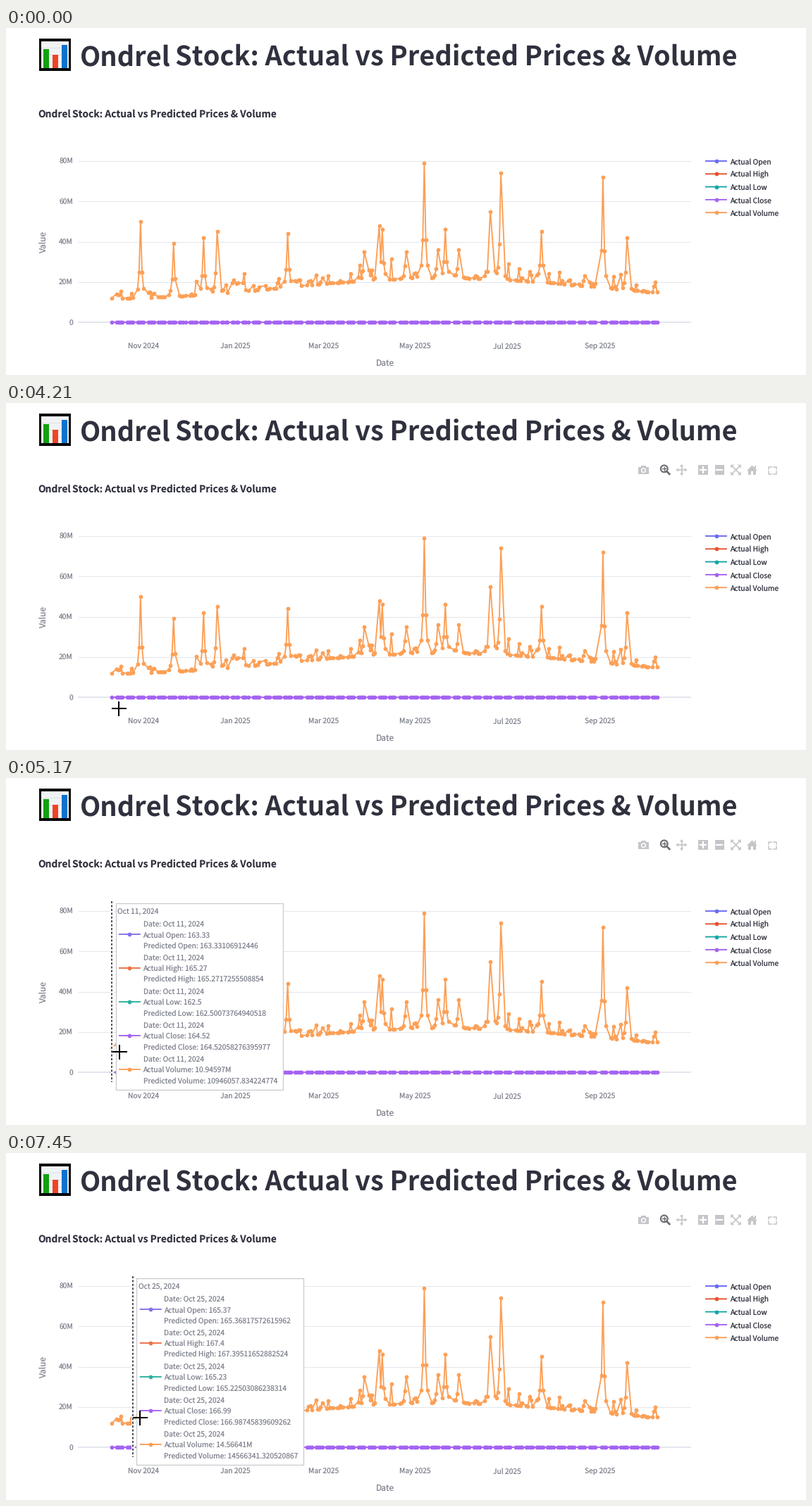
Write a matplotlib script that moves like this. It is 1135 px wide and 493 px high and loops after 8000 ms.

```python
import numpy as np
import matplotlib.pyplot as plt
from matplotlib.animation import FuncAnimation
from matplotlib.patches import Circle, Polygon, Rectangle
from matplotlib.transforms import Affine2D

W, H, DPI = 1135, 493, 128
PT = 72 / DPI                      # points per pixel
LOOP, STEP = 8000, 40
NAME = "Ondrel"
HEADING = "Stock: Actual vs Predicted Prices & Volume"

INK, GREY, GRID, ICON = "#2f313e", "#80838f", "#e4e6ed", "#c6c6ca"
SERIES = {"Open": "#6b6bf3", "High": "#e6522f", "Low": "#17a6a9",
          "Close": "#a463f2", "Volume": "#fca057"}
TIP_COLORS = ["#8570e8", "#ec7145", "#2bb09f", "#a463f2", "#fca057"]

plt.rcParams.update({"font.family": "Noto Sans CJK JP", "text.hinting": "none",
                     "savefig.dpi": DPI})
fig = plt.figure(figsize=(W / DPI, H / DPI), dpi=DPI, facecolor="white")
ax = fig.add_axes([0, 0, 1, 1])
ax.set(xlim=(0, W), ylim=(H, 0))
ax.axis("off")


def line(xs, ys, color, width, **kw):
    return ax.plot(xs, ys, color=color, lw=width * PT, **kw)[0]


def marked(xs, ys, color, **kw):
    return line(xs, ys, color, 1.9, marker="o", ms=5.8 * PT, mew=0, **kw)


def key(x, y, color, **kw):
    """A short line with a dot in its middle."""
    return [line([x - 14.5, x + 14.5], [y, y], color, 1.9, snap=False, **kw),
            marked([x], [y], color, **kw)]


def rect(x, y, w, h, color, **kw):
    return ax.add_patch(Rectangle((x, y), w, h, fc=color, lw=0, **kw))


def poly(points, color, **kw):
    kw.setdefault("lw", 0)
    return ax.add_patch(Polygon(points, fc=color, **kw))


def disc(x, y, r, color):
    return ax.add_patch(Circle((x, y), r, fc=color, lw=0))


def text(x, y, s, px=11.5, color=GREY, **kw):
    # the font's Latin glyphs are drawn 1.118 times larger than nominal
    return ax.text(x, y, s, fontsize=px / 1.118 * PT, color=color, **kw)


# ---- data: a slow swell with noise, and a few busy days ---------------

HOLIDAYS = {48, 75, 82, 90, 101, 129, 189, 227, 251, 266, 325}
PEAKS = {19: 50, 41: 39, 61: 42, 70: 45, 117: 44, 168: 35, 178: 48, 180: 46,
         196: 35, 208: 79, 217: 36, 222: 46, 231: 36, 252: 55, 259: 74,
         286: 45, 327: 72, 343: 42}

# predicted open, high, low, close and volume, then actual volume in millions
PRICES = {
    0: (163.33106912446, 165.2717255508854, 162.50073764940518,
        164.52058276395977, 10946057.834224774, 10.94597),
    4: (167.13836539629463, 169.090651320317, 166.05067231997361,
        166.900917592685, 14829368.951941328, 14.82934),
    7: (164.87034520466455, 166.36957241497137, 164.74954269443697,
        165.04961436885458, 13091239.283385437, 13.09127),
    14: (165.36817572615962, 167.39511652882524, 165.22503086238314,
         166.98745839609262, 14566341.320520867, 14.56641),
}


def day_x(day):
    return 150.4 + 2.13 * day


def value_y(millions):
    return 418.2 - 2.867 * millions


def make_volume(days):
    rng = np.random.default_rng(12)
    swell = 12 + 10 * np.sin(np.pi * days / 440) ** 2
    v = swell + rng.normal(0, 1, len(days)) * (2 + 1.8 * np.minimum(days / 60, 1))
    for day, top in PEAKS.items():
        v = np.maximum(v, swell + (top - swell) * np.exp(-1.1 * abs(days - day)))
    return np.maximum(v, 7)


# day 0 is a Friday
days = np.array([d for d in range(364) if d % 7 not in (1, 2) and d not in HOLIDAYS])
volume = make_volume(days)


# ---- page -------------------------------------------------------------

def draw_heading():
    rect(46.5, 15, 45.5, 45.5, "#050505")
    rect(50, 18.5, 38.5, 38.5, "#f0f3f5")
    for y in (28, 38, 48):
        rect(50, y, 38.5, 0.8, "#dde2e5")
    for x, top, color in ((53, 30, "#12a012"), (66, 38, "#ee4423"), (79, 24, "#0f72cf")):
        rect(x, top, 7.5, 57 - top, color)
    for x, y, px in ((105, 53, 42.5), (45, 127, 15.45)):
        text(x, y, NAME, px, INK, weight="bold")
        text(x + 3.18 * px, y, HEADING, px, INK, weight="bold")


def draw_chart():
    for m in (80, 60, 40, 20, 0):
        y = value_y(m)
        line([103, 971], [y, y], GRID, 1 if m else 2)
        text(95, y + 4.4, f"{m}M" if m else "0", ha="right")
    for day, label in zip((21, 82, 141, 202, 263, 325),
                          ("Nov 2024", "Jan 2025", "Mar 2025",
                           "May 2025", "Jul 2025", "Sep 2025")):
        text(day_x(day), 455.5, label, ha="center")
    text(537.5, 480, "Date", 13.4, ha="center")
    text(60, 305, "Value", 13.4, ha="right", va="center", rotation=90)
    marked(day_x(days), np.full(len(days), 418.2), SERIES["Close"])
    marked(day_x(days), value_y(volume), SERIES["Volume"])
    for k, (label, color) in enumerate(SERIES.items()):
        y = 189 + 18.3 * k
        key(1007.5, y, color)
        text(1027, y + 4.5, "Actual " + label, color=INK)
    line([0, W], [H - 0.5] * 2, "#e3e3e6", 1)
    line([W - 0.5] * 2, [0, H], "#e9e9ec", 1)


# ---- toolbar ----------------------------------------------------------

def draw_toolbar():
    before = set(ax.get_children())
    cy = 95
    corners = [(sx, sy) for sx in (-1, 1) for sy in (-1, 1)]
    # camera
    rect(897, 90.5, 15, 10.5, ICON)
    rect(901, 88.5, 7, 3, ICON)
    disc(904.5, 95.7, 3.6, "white")
    disc(904.5, 95.7, 2.1, ICON)
    # pan
    line([952, 965], [cy, cy], ICON, 1.7)
    line([958.5] * 2, [88.5, 101.5], ICON, 1.7)
    for dx, dy in ((1, 0), (-1, 0), (0, 1), (0, -1)):
        tip = np.array([958.5 + 7.8 * dx, cy + 7.8 * dy])
        back, side = np.array([dx, dy]) * 3.2, np.array([dy, dx]) * 2.8
        poly([tip, tip - back + side, tip - back - side], ICON)
    # zoom in and out
    for x in (989, 1012.3):
        rect(x - 6.8, cy - 6.8, 13.6, 13.6, ICON)
        line([x - 4, x + 4], [cy, cy], "white", 2.2)
    line([989, 989], [cy - 4, cy + 4], "white", 2.2)
    # autoscale and full screen
    for sx, sy in corners:
        x, y = 1035.5 + 7.3 * sx, cy + 7.3 * sy
        line([1035.5, x - 2 * sx], [cy, y - 2 * sy], ICON, 1.7)
        poly([(x, y), (x - 5 * sx, y), (x, y - 5 * sy)], ICON)
        x, y = 1087.5 + 5.2 * sx, cy + 0.7 + 5 * sy
        line([x - 3.6 * sx, x, x], [y, y, y - 3.6 * sy], ICON, 1.6)
    # home
    poly([(1051, 96), (1058.5, 88.5), (1066, 96)], ICON)
    rect(1062.3, 89, 2, 4, ICON)
    rect(1053.3, 94.5, 10.4, 2.8, ICON)
    for x in (1053.3, 1059.7):
        rect(x, 95, 4, 6.5, ICON)
    # magnifier
    lens = ax.add_patch(Circle((933.8, 93.4), 4.9, fc="none", lw=2.1 * PT))
    magnifier = [lens, line([937.3, 941.3], [97, 101], ICON, 2.7),
                 line([931.4, 936.2], [93.4] * 2, ICON, 1.4),
                 line([933.8] * 2, [91, 95.8], ICON, 1.4)]
    return [a for a in ax.get_children() if a not in before], magnifier


# ---- hover label and pointer ------------------------------------------

def draw_tip(trans):
    kw = dict(transform=trans, zorder=10)
    parts = [line([0, 0], [175, 432], "white", 4.6, **kw),
             line([0, 0], [175, 432], "#26272f", 1.6, ls=(0, (1.9, 1.5)), **kw),
             ax.add_patch(Rectangle((5.2, 177.5), 237, 265, fc="white",
                                    ec="#cbccd0", lw=1.3 * PT, **kw))]
    labels = [text(8, 193, "", **kw)]
    for k, color in enumerate(TIP_COLORS):
        y = 222 + 48 * k
        parts += key(25, y, color, **kw)
        labels += [text(44.2, y + dy, "", **kw) for dy in (-10.8, 4.3, 19.5)]
    return parts + labels, labels


def tip_lines(day):
    known = list(PRICES)
    row = [float(np.interp(day, known, column)) for column in zip(*PRICES.values())]
    date = f"Oct {11 + day}, 2024"
    lines = [date]
    for label, pred in zip(SERIES, row):
        actual = f"{row[5]:.5f}M" if label == "Volume" else round(pred, 2)
        lines += [f"Date: {date}", f"Actual {label}: {actual}", f"Predicted {label}: {pred}"]
    return lines


def draw_pointers(trans):
    kw = dict(transform=trans, zorder=20)
    arrow = poly([(0, 0), (0, 16), (3.7, 12.6), (6.2, 18), (8.6, 17), (6.2, 11.8), (11, 11.5)],
                 "black", ec="white", lw=PT, **kw)
    cross = [line([-9.5, 9.5], [0, 0], "black", 2, **kw),
             line([0, 0], [-9.5, 9.5], "black", 2, **kw)]
    return arrow, cross


# ---- motion -----------------------------------------------------------

TOOLBAR_ON, ZOOM_ON, CROSS_ON = 3650, 3990, 4140
HOVER_LAG, HOTSPOT, PLOT_BOTTOM = 90, 9.8, 432


def span(t, start, end):
    return min(max((t - start) / (end - start), 0), 1)


def ease_out(u, power):
    return 1 - (1 - u) ** power


def pointer(t):
    if t < CROSS_ON:
        u = span(t, TOOLBAR_ON, 3850)
        return 150 - 40 * u, 473 - 19 * u
    # swing up into the plot and back, rest, then drift right
    u, v = span(t, 4240, 4900), span(t, 6820, 7300)
    x = 160 + u + 215 * u * (1 - u) ** 4 + 29 * ease_out(v, 2)
    y = 434 - 45 * ease_out(u, 2.2) - 13 * ease_out(v, 4)
    return x, y


def hovered_day(t):
    x, y = pointer(t - HOVER_LAG)
    if t - HOVER_LAG < CROSS_ON or y > PLOT_BOTTOM:
        return None
    return int(days[np.argmin(abs(day_x(days) - (x - HOTSPOT)))])


draw_heading()
draw_chart()
toolbar, magnifier = draw_toolbar()
tip_shift, pointer_shift = Affine2D(), Affine2D()
tip, tip_labels = draw_tip(tip_shift + ax.transData)
arrow, cross = draw_pointers(pointer_shift + ax.transData)


def show(artists, on):
    for a in artists:
        a.set_visible(on)


def update(i):
    t = i * STEP + STEP - 1
    show(toolbar, t >= TOOLBAR_ON)
    for part in magnifier:
        part.set_color("#6c6c72" if t >= ZOOM_ON else "#9a9a9f")
    magnifier[0].set_facecolor("none")

    x, y = pointer(t)
    pointer_shift.clear().translate(round(x), round(y))
    show([arrow], TOOLBAR_ON <= t < CROSS_ON)
    show(cross, t >= CROSS_ON)

    day = hovered_day(t)
    show(tip, day is not None)
    if day is not None:
        tip_shift.clear().translate(day_x(day), 0)
        for label, s in zip(tip_labels, tip_lines(day)):
            label.set_text(s)
    return []


anim = FuncAnimation(fig, update, frames=LOOP // STEP, interval=STEP,
                     repeat=True, repeat_delay=0, blit=False)
plt.show()
```
